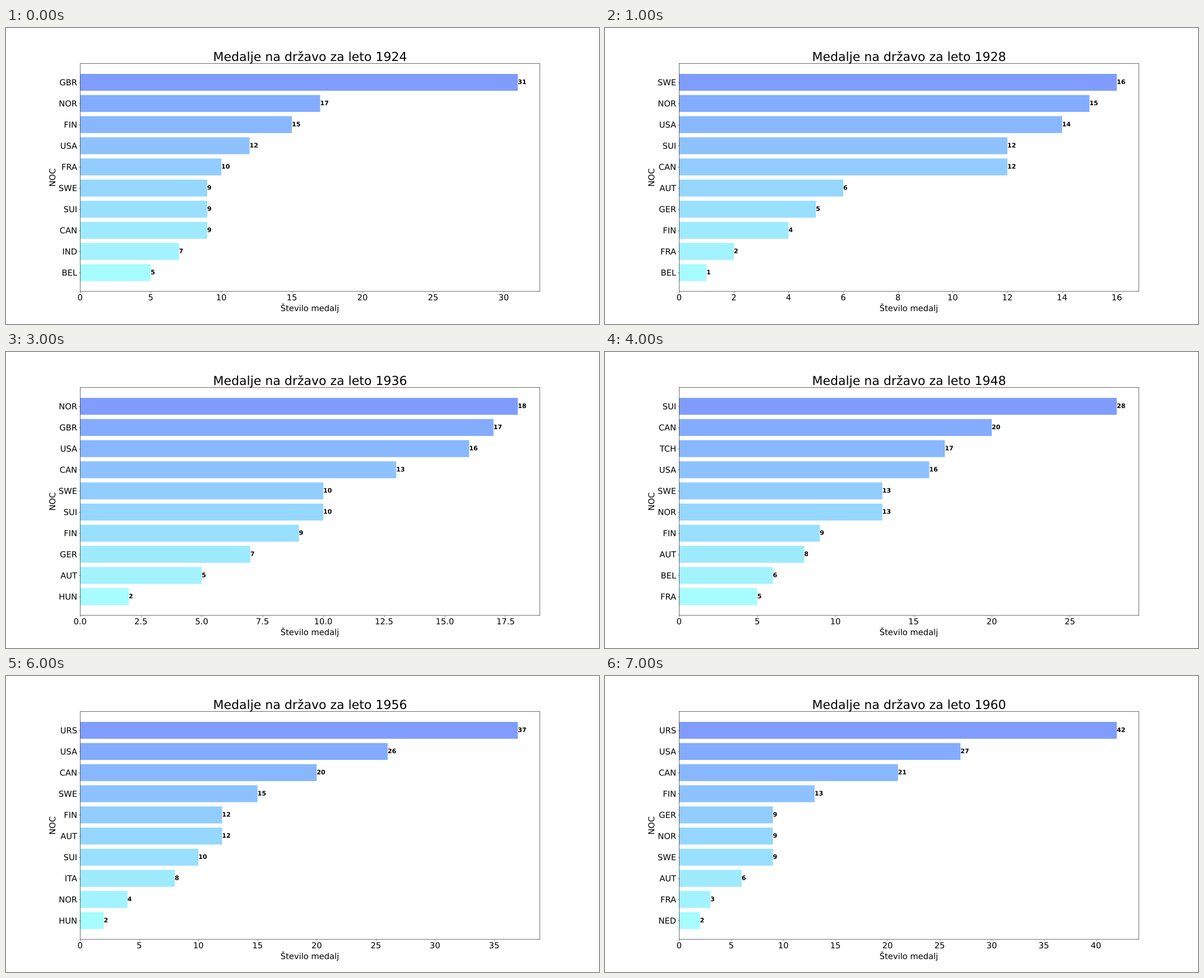
These frames come from a looping animation (1058 px wide and 529 px high, 8 s). A matplotlib script:

```python
import numpy as np
import matplotlib.pyplot as plt
from matplotlib.animation import FuncAnimation
from matplotlib.patheffects import Normal

plt.rcParams.update({
    "font.family": "DejaVu Sans",
    "text.hinting": "no_hinting",
    "path.snap": False,
    "path.effects": [Normal()],  # draws text as outlines at subpixel positions
    "axes.titlesize": 30,
    "axes.labelsize": 20,
    "xtick.labelsize": 20,
    "ytick.labelsize": 20,
})

# One line per games: the ten leading teams with their medals.
RESULTS = """
GBR 31 NOR 17 FIN 15 USA 12 FRA 10 SWE 9 SUI 9 CAN 9 IND 7 BEL 5
SWE 16 NOR 15 USA 14 SUI 12 CAN 12 AUT 6 GER 5 FIN 4 FRA 2 BEL 1
USA 34 CAN 20 GER 14 NOR 10 SWE 3 FIN 3 HUN 2 AUT 2 SUI 2 FRA 2
NOR 18 GBR 17 USA 16 CAN 13 SWE 10 SUI 10 FIN 9 GER 7 AUT 5 HUN 2
SUI 28 CAN 20 TCH 17 USA 16 SWE 13 NOR 13 FIN 9 AUT 8 BEL 6 FRA 5
USA 30 SWE 23 NOR 19 CAN 17 GER 12 FIN 12 AUT 8 SUI 6 NED 3 ITA 2
URS 37 USA 26 CAN 20 SWE 15 FIN 12 AUT 12 SUI 10 ITA 8 NOR 4 HUN 2
URS 42 USA 27 CAN 21 FIN 13 GER 9 NOR 9 SWE 9 AUT 6 FRA 3 NED 2
""".strip().splitlines()

# Every fourth year, with the wartime games left out.
YEARS = [year for year in range(1924, 1961, 4) if year not in (1940, 1944)]


def rank_colors(count=10):
    """Blue for the first rank, easing to pale cyan for the last."""
    t = np.linspace(0, 1, count)
    return np.column_stack([128 + 38 * t, 157 + 95 * t**0.85, 254 + 0 * t]) / 255


COLORS = rank_colors()

fig, ax = plt.subplots(figsize=(20, 10), dpi=52.9)
fig.subplots_adjust(left=0.125, right=0.9, bottom=0.11, top=0.88)


def draw(frame):
    fields = RESULTS[frame].split()
    teams, medals = fields[::2], [int(n) for n in fields[1::2]]
    ax.clear()
    ax.barh(teams[::-1], medals[::-1], color=COLORS[::-1])
    for row, count in enumerate(reversed(medals)):
        ax.text(count, row, str(count), size=15, weight="bold", va="center")
    ax.set_title(f"Medalje na državo za leto {YEARS[frame]}")
    ax.set_xlabel("Število medalj")
    ax.set_ylabel("NOC")
    return []


anim = FuncAnimation(fig, draw, frames=len(YEARS), init_func=lambda: draw(0),
                     interval=1000, repeat=True, repeat_delay=0, blit=False)
plt.show()
```
